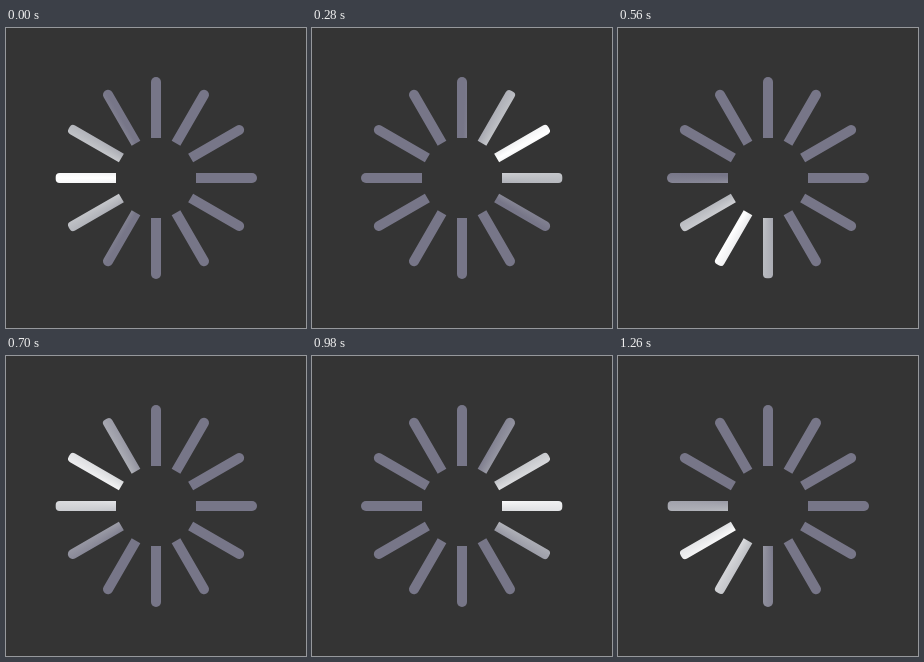
Recreate the animation shown at these times as an HTML page with a canvas. Size 300 px wide and 300 px high, loop 1.33 s.

```html
<!DOCTYPE html>
<html lang="en">
<head>
<meta charset="utf-8">
<title>Spinner</title>
<style>
  html, body { margin: 0; width: 100%; height: 100%; overflow: hidden; background: #343434; }
  canvas { display: block; width: 300px; height: 300px; }
</style>
</head>
<body>
<canvas id="stage" width="300" height="300"></canvas>
<script>
const ctx = document.getElementById('stage').getContext('2d');
const STEP = 70, STEPS = 19, TURNS = 2, BARS = 12;
const TAU = Math.PI * 2;
const BASE = '#777688', MID = '#b9bbc0', LIGHT = '#ffffff';

// Conic light that fades to the base colour 60 degrees either side of its head.
function sweep(head) {
  const light = ctx.createConicGradient(head + Math.PI / 2, 0, 0);
  light.addColorStop(1 / 3, BASE);
  light.addColorStop(5 / 12, MID);
  light.addColorStop(1 / 2, LIGHT);
  light.addColorStop(7 / 12, MID);
  light.addColorStop(2 / 3, BASE);
  return light;
}

function drawBar(angle, head) {
  const lit = Math.cos(head - angle) > 0.7;
  const outer = lit ? 100.3 : 101;
  const cap = lit ? 4 : 5;
  ctx.save();
  ctx.translate(150, 150);
  ctx.rotate(angle);
  ctx.fillStyle = sweep(head - angle);
  ctx.beginPath();
  ctx.roundRect(-5, -outer, 10, outer - 40, [cap, cap, 0, 0]);
  ctx.fill();
  ctx.restore();
}

function draw(now) {
  const step = Math.floor(now / STEP) % STEPS;
  const head = TAU * (0.75 + TURNS * step / STEPS);
  ctx.fillStyle = '#343434';
  ctx.fillRect(0, 0, 300, 300);
  for (let i = 0; i < BARS; i++) drawBar(TAU * i / BARS, head);
}

const start = performance.now();
function tick() {
  draw(performance.now() - start);
  requestAnimationFrame(tick);
}
tick();
</script>
</body>
</html>
```
